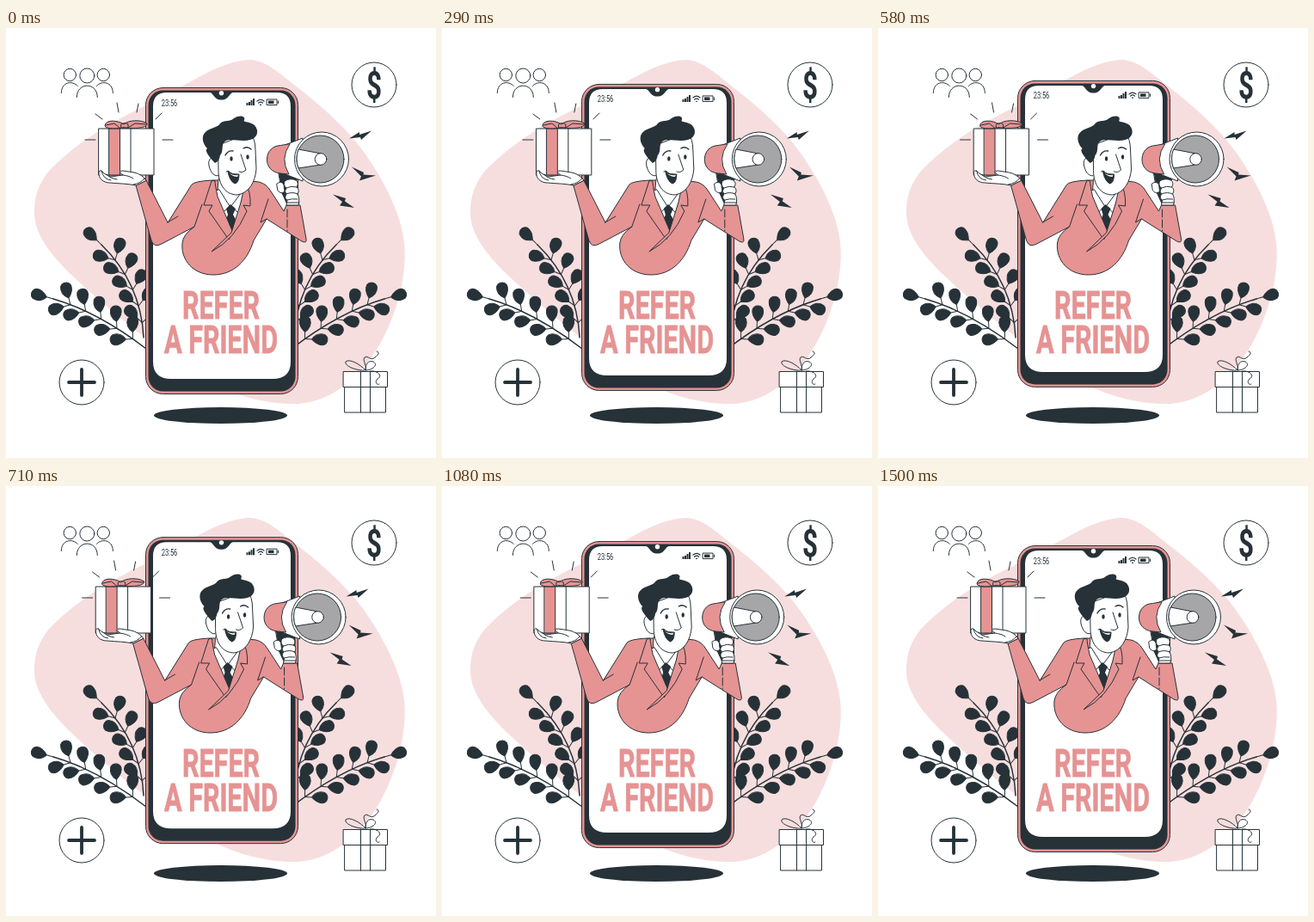
Animation, 500 px wide and 500 px high, one loop 1540 ms. Source, as an HTML page:

```html
<!DOCTYPE html>
<html lang="en">
<head>
<meta charset="utf-8">
<title>Refer a friend</title>
<style>
  html, body { margin: 0; width: 100%; height: 100%; overflow: hidden; background: #fff; }
  svg { display: block; width: 100%; height: 100%; }
  text { font-family: Roboto, "Open Sans", sans-serif; text-anchor: middle; }
  .line { fill: none; }
  .white { fill: #fff; }
  .pink { fill: #e69393; }
  .dark { fill: #263238; }
  .solid { stroke: none; }
  .art { stroke: #263238; stroke-width: 1; stroke-linejoin: round; stroke-linecap: round; }
  .title { font-weight: 700; font-size: 45px; stroke: #e69393; stroke-width: .8; }
</style>
</head>
<body>
<svg viewBox="0 0 500 500" class="art">
  <path class="solid" fill="#f7dede" d="M284 37C271 37 255 42 240 49C216 61 192 75 165 89C125 108 85 131 54 162C39 177 32 196 33 217C34 240 52 264 76 287C120 328 180 378 235 411C265 427 302 438 340 437C382 434 415 402 435 367C455 332 467 285 463 249C459 215 440 178 416 144C394 114 367 91 335 66C315 50 302 38 284 37Z"/>

  <!-- group of people -->
  <g class="line" transform="translate(-.7 -.5)">
    <circle cx="75" cy="55" r="7.2"/><circle cx="95" cy="56" r="8.5"/><circle cx="114" cy="55" r="7.2"/>
    <path d="M83 81C83 63 107 63 107 81M65 76C65 63 78 61 84 68M106 68C112 61 125 63 125 76"/>
  </g>

  <!-- round badges -->
  <circle class="white" cx="428" cy="66" r="26"/>
  <text class="dark solid" transform="translate(428 82) scale(.7 1)" font-size="45" font-weight="700">$</text>
  <circle class="white" cx="88" cy="412" r="26"/>
  <path class="line" stroke-width="3.8" d="M73 412H103M88 397V427"/>

  <!-- outlined gift -->
  <g class="line">
    <path class="white" d="M394 417.500H441.500V447H394Z"/><path class="white" d="M392.500 399.500H443.500V417.500H392.500Z"/>
    <path d="M412.500 399V447M423.500 399V447M418 398C408 399 393 393 395 388C399 384 412 391 418 398C418 391 421 386 427 388C434 392 425 398 418 398C420 393 414 386 417 383C421 380 424 388 429 383C433 380 435 377 431 376M424 399C431 398 439 404 432 408C428 412 432 416 434 414"/>
  </g>

  <g id="plants" class="dark"></g>
  <ellipse class="dark solid" cx="249.5" cy="450.5" rx="77.5" ry="9.5"/>

  <g id="phone">
    <rect class="pink" x="162.500" y="69.500" width="177" height="356" rx="20"/>
    <rect class="dark solid" x="165.500" y="72.500" width="171" height="350" rx="17"/>
    <path class="white solid" d="M187 75H236C242 75 241 83.500 250.500 83.500C260 83.500 259 75 265 75H315Q331 75 331 91V388Q331 408 310 408H192Q171 408 171 388V91Q171 75 187 75Z"/>
    <circle class="white solid" cx="250.5" cy="75.7" r="2.7"/>
    <text class="dark solid" transform="translate(190 90.500) scale(.68 1)" font-size="11">23:56</text>
    <path class="line" stroke-width="2" stroke-linecap="butt" d="M280.500 90V87M283 90V86M285.500 90V84M288 90V82"/>
    <path class="line" stroke-width="1.2" d="M292 85Q296 81.500 300 85M293.500 87.200Q296 85 298.500 87.200M295.500 89.300H296.500"/>
    <path class="line" d="M303.500 83H315V89.500H303.500ZM316.500 85V87.500"/>
    <path class="dark solid" d="M305 84.500H311.500V88H305Z"/>
  </g>

  <g class="pink title">
    <text transform="translate(250 338) scale(.68 1)">REFER</text>
    <text transform="translate(250 377.500) scale(.68 1)">A FRIEND</text>
  </g>

  <g id="man">
    <!-- sparks and bolts -->
    <path class="line" d="M92 130H104M104 100L112 106M129 87L131 98M154 88L152 98M181 99L174 106M182 130H194"/>
    <path class="dark solid" d="M399 128.500L411 121L411 124L425 119.500L413 130L412 127Z"/>
    <path class="dark solid" d="M402 161.500L416 168L415.500 170.500L430 171.500L411 177.500L413 172.500Z"/>
    <path class="dark solid" d="M380 193.500L395 198L394 201.500L405 209L388 206.500L391 202Z"/>

    <!-- jacket -->
    <path class="pink" d="M216 182Q219 178 240 177L276 177L294 179Q303 181 308 190L323 213L326 206L342 206L349 245Q350 251 344 248L303 222L288 247C281 270 265 287 241 287C218 287 203 270 205 250Q206 240 219 231L181 251Q172 256 169 247L151 183L163 177L188 226Z"/>
    <path class="line" d="M219 231L228 205M303 222L296 226L305 199M188 226L200 219"/>
    <path class="line" stroke-dasharray="9 3" d="M327 211V236"/>

    <!-- neck, shirt and tie -->
    <path class="white" d="M247 177L249 170H278L277 180L269 232L261 241L245 205Z"/>
    <path class="white" d="M248 188L260 207L251 216L243 190ZM276 188L262 207L270 215L278 188Z"/>
    <path class="dark solid" d="M256 210L261 205L267 210L264 217L269 226L261 240L254 228L258 217Z"/>
    <path class="pink" d="M239 178L230 206L240 206L236 213L259 246L264 238L246 196Q243 182 243 178Z"/>
    <path class="pink" d="M278 179Q285 190 284 207L276 206L280 213Q266 246 239 260L262 238L273 203Q276 190 278 179Z"/>

    <!-- head -->
    <path class="white" d="M248 151C242 147 234 151 236 160C238 169 243 174 249 171Z"/>
    <path class="white" d="M247 136L284 122Q290 129 290 142L291 164C290 178 283 192 269 194C255 194 247 182 247 166Z"/>
    <path class="dark solid" d="M241 155C234 147 231 142 234 140C228 134 227 125 232 121C237 116 246 116 249 111C254 106 260 110 265 105C271 101 279 102 277 107C275 110 283 108 289 113C295 120 292 128 284 130C274 133 262 128 256 131C249 134 254 143 249 148Q248 155 243 157Z"/>
    <ellipse class="dark solid" cx="262" cy="152" rx="1.7" ry="2.8"/>
    <ellipse class="dark solid" cx="281" cy="150" rx="1.7" ry="2.8"/>
    <path class="line" stroke-width="1.4" d="M255 148Q258 142 264 143M276 140Q281 137 285 141"/>
    <path class="line" d="M273 147L279 165Q275 169 271 167M256 167Q258 165 260 167"/>
    <path class="dark" d="M258 167Q264 171 271 170Q271 180 266 181Q260 178 258 167Z"/>
    <path class="white solid" d="M260 169Q265 172 270 171L269 173Q264 173 260 169Z"/>

    <!-- gift and left hand -->
    <path class="white" d="M108 117H172V171H108Z"/>
    <path class="pink" d="M120 117H132.500V171H120Z"/>
    <path class="line" d="M145 117V171"/>
    <path class="pink" d="M137 116C129 117 117 118 115 114C115 106 130 107 137 112C142 107 157 106 164 111C164 117 149 117 137 116Z"/>
    <path class="line" d="M132 116L126 111L116 113M142 116L150 111L163 112M134 112Q138 109 142 112V116H134Z"/>
    <path class="white" d="M151 183C142 181 132 181 121 180C113 180 107 175 108 167Q110 164 114 169L121 173L136 171Q129 166 136 166L149 168Q158 170 163 177Z"/>
    <path class="line" d="M111 166Q113 176 122 177M117 170Q121 175 129 176M136 171Q144 172 148 175M148 182Q156 181 161 175"/>

    <!-- megaphone -->
    <path class="dark" d="M317 167L336 167L338 177L327 179L326 203L321 192Z"/>
    <path class="white" d="M322 137L345 128V178L322 169Z"/>
    <path class="pink" d="M330 135Q318 152 329 170L319 169C309 168 303 161 303.500 152C304 143 310 137 319 136.500Z"/>
    <circle class="white" cx="367" cy="152.5" r="31.5"/>
    <circle cx="365.5" cy="152.5" r="27.5" fill="#a6a6a8"/>
    <path class="white" d="M366 146L340 141Q336 152 340 163L366 159Z"/>
    <circle class="white" cx="366" cy="152.5" r="6.8"/>
    <path class="white" d="M324 178Q330 174 337 177Q341 180 338 185Q342 188 339 193Q342 198 340 206H326L327 200Q323 198 326 193Q323 190 326 186Q322 183 324 178Z"/>
    <path class="white" d="M315 181Q320 177 323 182L324 190Q320 194 316 189Z"/>
    <path class="line" d="M326 186Q332 183 338 185M326 193Q333 190 339 193M327 200Q332 198 339 199M326 203H341"/>
  </g>
</svg>
<script>
  const $ = id => document.getElementById(id);
  const mix = (a, b, u) => a + (b - a) * u;

  const LEAF = "M0 0L8 0C12 -6 18 -7.500 23 -6C28 -3 27 4 22 6C17 7 12 4 8 0Z";
  const leaf = (x, y, deg, flip) =>
    `<path d="${LEAF}" transform="translate(${x} ${y}) rotate(${deg}) scale(1 ${flip})"/>`;

  // Quadratic stem with paired leaves and one at the tip.
  function branch(a, c, b, pairs) {
    const at = (i, u) => mix(mix(a[i], c[i], u), mix(c[i], b[i], u), u);
    const angle = u => Math.atan2(
      mix(c[1] - a[1], b[1] - c[1], u), mix(c[0] - a[0], b[0] - c[0], u)) * 180 / Math.PI;
    let out = `<path class="line" stroke-width="1.5" d="M${a}Q${c} ${b}"/>`;
    for (let i = 0; i < pairs; i++) {
      const u = mix(.14, .81, i / (pairs - 1));
      out += leaf(at(0, u), at(1, u), angle(u) + 55, 1);
      out += leaf(at(0, u), at(1, u), angle(u) - 38, -1);
    }
    return out + leaf(b[0], b[1], angle(1), 1);
  }

  const side = branch([160, 360], [157, 297], [111, 252], 5)
             + branch([163, 373], [107, 330], [55, 315], 5);
  $("plants").innerHTML = `<g>${side}</g><g transform="matrix(-1 0 0 1 495 0)">${side}</g>`;

  const LOOP = 1540, STEP = LOOP / 37;
  const SHAKE = [0, -1, 2, -4, 4, -4, 4, -4, 2, -1, 0];

  function draw(now) {
    const step = Math.floor((now % LOOP + 4) / STEP);
    const p = Math.min(1, step / 34.5);
    const i = Math.min(9, Math.floor(p * 10));
    const x = mix(SHAKE[i], SHAKE[i + 1], p * 10 - i);
    const y = -10 * (1 - Math.abs(1 - 2 * p));
    $("man").setAttribute("transform", `translate(${x} 0)`);
    $("phone").setAttribute("transform", `translate(0 ${y})`);
  }

  function tick() {
    draw(performance.now());
    requestAnimationFrame(tick);
  }
  tick();
</script>
</body>
</html>
```
